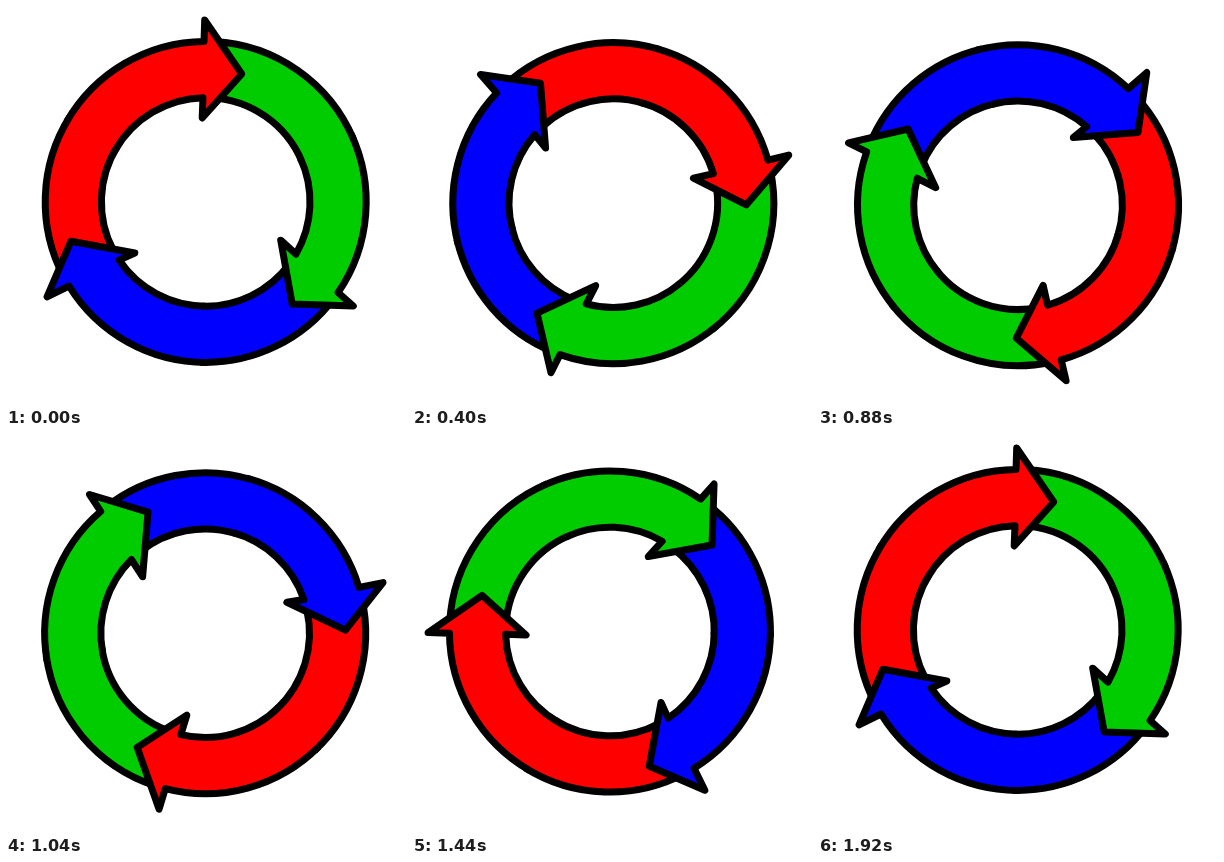
Recreate the animation shown at these times as an HTML page with a canvas. Size 400 px wide and 400 px high, loop 2000 ms.

```html
<!DOCTYPE html>
<html lang="en">
<head>
<meta charset="utf-8">
<title>Turning arrows</title>
<style>
html, body { margin: 0; width: 100%; height: 100%; overflow: hidden; background: #fff; }
canvas { display: block; }
</style>
</head>
<body>
<canvas id="stage" width="400" height="400"></canvas>
<script>
const ctx = document.getElementById('stage').getContext('2d');
const LOOP = 2000, STEP = 80, TURN = 15;
const PIVOT = [199.65, 197.6];
const HUB = [199.7, 195.9];   // ring centre, slightly off the pivot
const OUTER = 160.5, INNER = 104.3;
const rad = deg => deg * Math.PI / 180;

// Angles in degrees: tail start, middle, outer and inner neck; head: outer barb, tip, inner barb
const arrows = [
  { color: '#ff0000', tail: 152, mid: 210, neckOut: 269.4, neckIn: 268.5,
    head: [[198.7, 14], [235.8, 68], [196.2, 112]] },
  { color: '#00cc00', tail: -87, mid: -25, neckOut: 34.4, neckIn: 30,
    head: [[347.3, 300], [286.2, 298], [274.7, 234.2]] },
  { color: '#0000ff', tail: 36.5, mid: 90, neckOut: 148.4, neckIn: 146.1,
    head: [[41, 290.8], [65, 235.2], [128.8, 247]] }
];

function arc(radius, from, to) {
  ctx.arc(HUB[0], HUB[1], radius, rad(from), rad(to), to < from);
}

function paint(color) {
  ctx.fillStyle = color;
  ctx.fill();
  ctx.stroke();
}

function drawTail(a) {
  ctx.beginPath();
  arc(OUTER, a.mid + 2, a.tail);
  arc(INNER, a.tail, a.mid + 2);
  paint(a.color);
}

function drawFront(a) {
  ctx.beginPath();
  arc(OUTER, a.mid, a.neckOut);
  a.head.forEach(p => ctx.lineTo(p[0], p[1]));
  arc(INNER, a.neckIn, a.mid);
  paint(a.color);
}

function draw(time) {
  const step = Math.floor((time % LOOP) / STEP);
  ctx.fillStyle = '#fff';
  ctx.fillRect(0, 0, 400, 400);
  ctx.save();
  ctx.translate(PIVOT[0], PIVOT[1]);
  ctx.rotate(rad(step * TURN));
  ctx.translate(-PIVOT[0], -PIVOT[1]);
  ctx.strokeStyle = '#000';
  ctx.lineWidth = 7;
  ctx.lineJoin = 'round';
  // All tails go below all heads, so each head overlaps the next arrow
  arrows.forEach(drawTail);
  arrows.forEach(drawFront);
  ctx.restore();
}

function tick() {
  draw(performance.now());
  requestAnimationFrame(tick);
}
tick();
</script>
</body>
</html>
```
